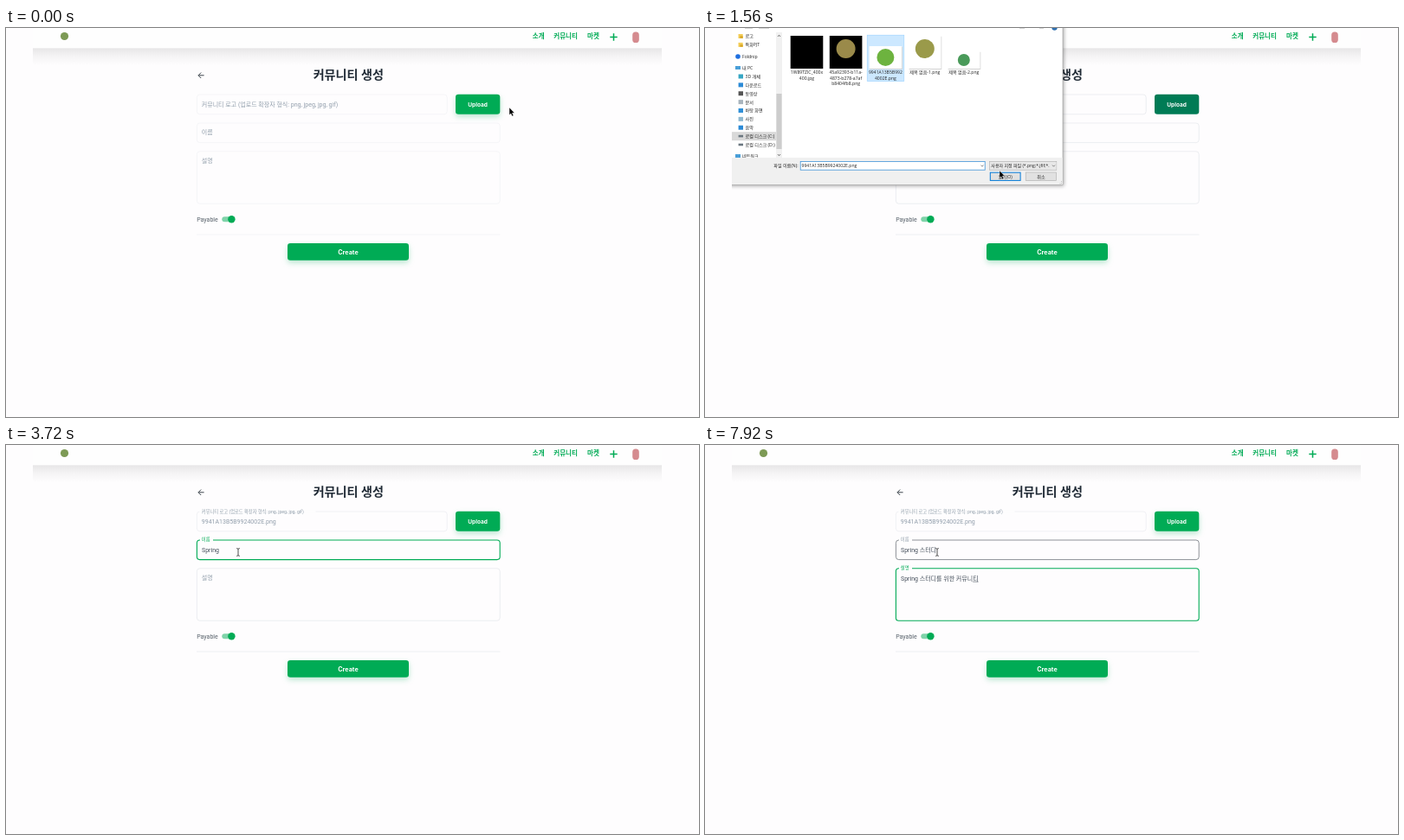
An HTML page that plays this animation: 800 by 450 pixels, repeating every 8 s.

```html
<!DOCTYPE html>
<html>
<head>
<meta charset="utf-8">
<title>커뮤니티 생성</title>
<style>
  html, body { margin: 0; width: 100%; height: 100%; overflow: hidden; background: #fefdfe; }
  svg { display: block; width: 100%; height: 100%; }
  text { font: 7px Roboto, "Noto Sans CJK KR", "Noto Sans CJK JP", sans-serif; white-space: pre; fill: #919eab; }
  .nav text { font-size: 7.5px; font-weight: 700; fill: #00ab55; }
  .title { font-size: 14.1px; font-weight: 700; fill: #212b36; }
  .btn { font-family: Inter, sans-serif; font-weight: 700; fill: #fff; text-anchor: middle; }
  .value { fill: #454f5b; }
  .box { fill: none; stroke: #dfe3e8; stroke-width: .6; }
  .glow { filter: drop-shadow(0 3px 3px rgba(0, 171, 85, .26)); }
  .dialog text { font: 5.1px "Open Sans", "Noto Sans CJK KR", "Noto Sans CJK JP", sans-serif; fill: #222; }
  .mid { text-anchor: middle; }
  .shade { filter: drop-shadow(1px 1px 2px rgba(0, 0, 0, .35)); }
</style>
</head>
<body>
<svg viewBox="0 0 800 450">
  <defs>
    <linearGradient id="fade" x2="0" y2="1">
      <stop offset="0" stop-color="#e6e5e6"/>
      <stop offset=".45" stop-color="#f4f3f4"/>
      <stop offset="1" stop-color="#fefdfe"/>
    </linearGradient>
    <clipPath id="screen"><rect x="31" y="0" width="726" height="450"/></clipPath>
  </defs>

  <rect width="800" height="450" fill="#fefdfe"/>
  <rect x="31" y="23" width="726" height="20" fill="url(#fade)"/>
  <rect x="31" width="726" height="23.3" fill="#fefefe"/>
  <circle cx="67.5" cy="9.5" r="4.6" fill="#7d9a55"/>
  <g class="nav">
    <text x="607.8" y="12">소개</text>
    <text x="632.3" y="12">커뮤니티</text>
    <text x="671" y="12">마켓</text>
    <path d="M697.3 10.5h8.4M701.5 6.3v8.4" stroke="#00ab55" stroke-width="1.5"/>
  </g>
  <rect x="723.2" y="4.5" width="7.6" height="12.5" rx="3.6" fill="#d58b8f"/>

  <path d="M228.6 54.8h-6.4M225.2 51.6l-3.2 3.2l3.2 3.2" fill="none" stroke="#3c444c" stroke-width="1"/>
  <text class="title mid" x="395.3" y="59">커뮤니티 생성</text>

  <g id="frames">
    <rect class="box" id="logoBox" x="220.4" y="77" width="288.8" height="22.8" rx="3.3"/>
    <rect class="box" id="nameBox" x="220.4" y="110" width="349.8" height="22.6" rx="3.3"/>
    <rect class="box" id="descBox" x="220.4" y="142.8" width="349.8" height="60.4" rx="3.3"/>
    <path d="M220 239h350.5" stroke="#e6e9ec" stroke-width=".7"/>
  </g>
  <g fill="#fefdfe">
    <rect id="logoGap" x="223.5" y="75.5" width="134" height="3"/>
    <rect id="nameGap" x="224" y="108.5" width="15" height="3"/>
    <rect id="descGap" x="224" y="141.3" width="15" height="3"/>
  </g>
  <text id="logoLabel">커뮤니티 로고 (업로드 확장자 형식: png, jpeg, jpg, gif)</text>
  <text id="nameLabel">이름</text>
  <text id="descLabel">설명</text>
  <text id="logoValue" x="225.8" y="90.8">9941A13B5B9924002E.png</text>
  <text class="value" id="nameValue" x="226" y="123.8"></text>
  <text class="value" id="descValue" x="226" y="156.6"></text>
  <rect id="underline" height=".6" fill="#454f5b"/>
  <rect id="caret" width=".7" height="8.6" fill="#333"/>

  <rect class="glow" id="upload" x="519" y="76.8" width="51.3" height="23" rx="3.3" fill="#00ab55"/>
  <text class="btn" x="544.6" y="90.7" style="font-size:6.5px">Upload</text>
  <text x="220.2" y="223.6" style="fill:#566069">Payable</text>
  <rect x="249.3" y="218.2" width="14.5" height="6" rx="3" fill="#7fd3a9"/>
  <circle cx="260.4" cy="221.2" r="4.2" fill="#00ab55"/>
  <rect class="glow" x="325" y="249" width="140" height="19.8" rx="3.3" fill="#00ab55"/>
  <text class="btn" x="395" y="261.5" style="font-size:7.2px">Create</text>

  <g clip-path="url(#screen)">
    <g class="dialog" id="dialog">
      <rect class="shade" x="20" y="-20" width="393" height="201.5" fill="#fff" stroke="#9a9a9a" stroke-width=".6"/>
      <path d="M46 0h9M62 0h12M363 0h6M386 0h5" stroke="#999" stroke-width=".8"/>
      <circle cx="403.5" cy="-.5" r="3.2" fill="#2f6fb0"/>
      <g id="pinned"></g>
      <g id="drives"></g>
      <rect x="82" y="5" width="7" height="145" fill="#f1f1f1"/>
      <rect x="82.4" y="76" width="6.2" height="64" fill="#cdcdcd"/>
      <path d="M84 10l1.5-1.8l1.5 1.8M84 146l1.5 1.8l1.5-1.8" fill="none" stroke="#555" stroke-width=".8"/>
      <rect id="pick" x="187.2" y="8.2" width="42.6" height="53.4" fill="#cce8ff" stroke="#99d1ff" stroke-width=".6"/>
      <g id="files"></g>
      <rect x="20" y="150" width="392.6" height="31" fill="#f0f0f0"/>
      <text x="107.5" y="161" text-anchor="end">파일 이름(N):</text>
      <rect x="110.2" y="154.4" width="213" height="9.8" fill="#fff" stroke="#3f93d8" stroke-width=".8"/>
      <text id="fileName" x="111.5" y="161"></text>
      <path id="fileCaret" d="M112.2 156v6.6" stroke="#222" stroke-width=".6"/>
      <rect x="328.4" y="154.4" width="77.4" height="9.8" fill="#e8e8e8" stroke="#adadad" stroke-width=".6"/>
      <text x="330.3" y="161" style="font-size:5px">사용자 지정 파일 (*.png;*.jfif;*.</text>
      <rect x="400" y="155" width="5.4" height="8.6" fill="#e8e8e8"/>
      <path d="M318.5 158.6l1.5 1.6l1.5-1.6M401 158.6l1.5 1.6l1.5-1.6" fill="none" stroke="#555" stroke-width=".7"/>
      <rect x="329.3" y="167.2" width="34.8" height="9.2" fill="#e1e1e1" stroke="#0078d7" stroke-width="1"/>
      <text class="mid" x="346.6" y="173.6">열기(O)</text>
      <rect x="370.2" y="167" width="35.4" height="9.6" fill="#e1e1e1" stroke="#adadad" stroke-width=".6"/>
      <text class="mid" x="388" y="173.6">취소</text>
      <path d="M411.5 177v3h-3" fill="none" stroke="#b5b5b5" stroke-width=".8" stroke-dasharray="1 1"/>
    </g>
  </g>

  <g id="cursor">
    <path id="arrow" d="M0 0v8.6l1.9-1.7l1.4 3.1l1.5-.7l-1.4-3h2.6z" fill="#000" stroke="#fff" stroke-width=".4"/>
    <path id="beam" d="M-1.8-4.4q1.8 0 1.8 1v6.8q0 1 1.8 1M1.8-4.4q-1.8 0-1.8 1M0 3.4q0 1-1.8 1" fill="none" stroke="#222" stroke-width=".8"/>
  </g>
</svg>

<script>
const LOOP = 8000, BLINK = 290;
const $ = id => document.getElementById(id);
const show = (id, on) => $(id).setAttribute('visibility', on ? 'visible' : 'hidden');
const set = (id, attrs) => { for (const k in attrs) $(id).setAttribute(k, attrs[k]); };
const ramp = (t, from, span) => Math.min(1, Math.max(0, (t - from) / span));
const smooth = p => p * p * (3 - 2 * p);

// ---- file dialog contents ----
const rect = (x, y, w, h, fill, more = '') => `<rect x="${x}" y="${y}" width="${w}" height="${h}" fill="${fill}" ${more}/>`;
const label = (x, y, s, cls = '') => `<text x="${x}" y="${y}" class="${cls}">${s}</text>`;
const folder = y => rect(38.5, y - 2.5, 5.2, 5, '#f3cd58') + rect(40.4, y - .3, 3.3, 2.8, '#d9a92c');
const sheet = y => rect(38.8, y - 2.7, 4.6, 5.4, '#fff', 'stroke="#888" stroke-width=".6"');
const pin = y => `<path d="M76.8 ${y + 1.5}l1.4-1.4m-1-1l2 2m-.8-2.4l1.4 1.4" stroke="#666" stroke-width=".7"/>`;

const links = ['Tolven', 'QOLEM', '자소서', 'LumDok', '두리온말 받은', '알고리즘', 'VSCodeProje', '2학기', 'ucc', '로고', '특화PJT'];
$('pinned').innerHTML = rect(31, 129.8, 51, 10, '#d9d9d9') +
  links.map((s, i) => {
    const y = 10 + i * 9.86;
    return (i < 5 ? folder(y) : sheet(y)) + label(46.5, y + 1.9, s) + (i < 7 ? pin(y) : '');
  }).join('') +
  label(43, 123.8, 'Foldnip') + label(43, 136.8, '내 PC') + label(43, 149.6, '네트워크');

const places = [['3D 개체', '#35a6c4'], ['다운로드', '#2b8ad6'], ['동영상', '#555'], ['문서', '#a9b4bd'], ['바탕 화면', '#2f8fd8'],
  ['사진', '#8fb8cf'], ['음악', '#2b8ad6'], ['로컬 디스크 (C:)', '#6b7780'], ['로컬 디스크 (D:)', '#6b7780']];
$('drives').innerHTML = rect(31, 120.2, 51, 10, '#d9d9d9') +
  folder(9.5) + label(46.5, 11.4, '로고') + folder(19.4) + label(46.5, 21.3, '특화PJT') +
  `<circle cx="38" cy="33" r="2.8" fill="#1f6fe0"/>` + label(43, 34.8, 'Foldnip') +
  rect(35, 44, 6, 4, '#4a9fd8') + label(43, 48, '내 PC') +
  places.map(([s, c], i) => {
    const y = 56 + i * 9.87, h = i > 6 ? 2.6 : 5;
    return rect(38.6, y - h / 2, 5.4, h, c) + label(46.5, y + 1.9, s);
  }).join('') +
  rect(35, 146, 6, 4, '#4a9fd8') + label(43, 149.6, '네트워크');

const files = [
  [117.5, 9, '#000', '', ['1W89TZlC_400x', '400.jpg']],
  [162.6, 9, '#000', '#9a8a4a', ['45a92393-b11a-', '4873-b278-a7af', 'b8404fb8.png']],
  [208.4, 21, '#fff', '#6db33f', ['9941A13B5B992', '4002E.png']],
  [253.8, 9, '#fff', '#9a9a4a', ['제목 없음-1.png']],
  [298.8, 27, '#fff', '#4a9a5a', ['제목 없음-2.png']]
];
$('files').innerHTML = files.map(([x, y, bg, dot, lines]) => {
  const h = 47 - y, r = Math.min(11, h / 2 - 3);
  return (bg === '#fff' ? rect(x - 18.2, y + .8, 37.6, h, '#c9c9c9') : '') + rect(x - 18.8, y, 37.6, h, bg) +
    (dot ? `<circle cx="${x}" cy="${y < 20 ? 24 : y + h / 2}" r="${r}" fill="${dot}"/>` : '') +
    lines.map((s, i) => label(x, 53 + i * 6.5, s, 'mid')).join('');
}).join('');

// ---- typing ----
const run = (start, step, base, parts) => parts.split('|').map((s, i) => [start + i * step, base + s]);
const nameKeys = [
  ...run(2760, 110, '', 'S|Sp|Spr|Spri|Sprin|Spring|Spring '),
  ...run(3900, 360, 'Spring ', 'ㅅ|스'),
  ...run(4500, 90, 'Spring ', '슽|스터|스턷|스터디')
];
const descKeys = [
  [5400, 'S'],
  ...run(5640, 60, '', 'Sp|Spr|Spri|Sprin|Spring|Spring |Spring ㅅ|Spring 스'),
  ...run(6360, 55, 'Spring ', '슽|스터|스턷|스터디|스터딜|스터디르|스터디를'),
  ...run(6745, 55, 'Spring 스터디를 ', '|ㅇ|우|위|윟|위하|위한|위한 '),
  ...run(7200, 60, 'Spring 스터디를 위한 ', 'ㅋ|커|컴|커뮤|커뮨|커뮤니|커뮤닡|커뮤니티')
];
const typed = (keys, t, focus) => keys.reduce((cur, k) => k[0] <= t ? k : cur, [focus, '']);

// ---- timeline ----
const CLICK = 240, OPEN = 480, TREE = 1140, PICK = 1320, CLOSE = 1860, NAME = 2430, DESC = 5040;
const path = [[0, 581, 92], [240, 550, 90], [450, 544, 89], [1020, 230, 97], [1260, 208, 42], [1340, 209, 43],
  [1560, 340, 165], [1740, 345, 170], [1900, 344, 169], [2360, 268, 124]];

function pointer(t) {
  const i = path.findIndex(p => p[0] > t);
  if (i < 0) return path[path.length - 1].slice(1);
  const [a, b] = [path[i - 1], path[i]], p = smooth((t - a[0]) / (b[0] - a[0]));
  return [a[1] + (b[1] - a[1]) * p, a[2] + (b[2] - a[2]) * p];
}

// floating label: slides up to the border and shrinks to 3/4
function float(id, t, from, y) {
  const p = smooth(ramp(t, from, 110));
  set(id + 'Label', { transform: `translate(225.8 ${y - 12.2 * p}) scale(${1 - .25 * p})` });
  show(id + 'Gap', p > .3);
}

function outline(id, focused, hovered) {
  $(id + 'Box').style.cssText = focused ? 'stroke:#00ab55;stroke-width:1.1' : hovered ? 'stroke:#5c636b;stroke-width:.7' : '';
  $(id + 'Label').style.fill = focused ? '#00ab55' : '';
}

function draw(t) {
  const [x, y] = pointer(t), beam = t >= 1960;
  set('cursor', { transform: `translate(${x.toFixed(2)} ${y.toFixed(2)})` });
  show('arrow', !beam);
  show('beam', beam);

  const busy = t >= CLICK && t < CLOSE;
  set('upload', { fill: busy ? '#007b55' : '#00ab55', class: busy ? '' : 'glow' });
  set('frames', { opacity: .5 + .5 * ramp(t, 200, 200) });
  $('logoBox').style.opacity = t < CLOSE ? 1 : .75;

  const open = t >= OPEN && t < CLOSE;
  $('dialog').style.display = open ? '' : 'none';
  $('dialog').style.opacity = ramp(t, OPEN - 30, 90);
  $('pinned').style.display = t < TREE ? '' : 'none';
  $('drives').style.display = t < TREE ? 'none' : '';
  $('pick').style.display = t < PICK ? 'none' : '';
  $('fileCaret').style.display = t < PICK ? '' : 'none';
  $('fileName').textContent = t < PICK ? '' : '9941A13B5B9924002E.png';

  show('logoValue', t >= CLOSE);
  float('logo', t, CLOSE, 90.7);
  float('name', t, NAME, 123.4);
  float('desc', t, DESC, 156.3);
  const onName = t >= NAME && t < DESC, onDesc = t >= DESC;
  outline('name', onName, beam && y < 132);
  outline('desc', onDesc, beam && y > 143);

  const name = typed(nameKeys, t, NAME), desc = typed(descKeys, t, DESC);
  $('nameValue').textContent = name[1];
  $('descValue').textContent = desc[1];

  const [last, text] = onDesc ? desc : name;
  const el = $(onDesc ? 'descValue' : 'nameValue'), base = onDesc ? 156.6 : 123.8;
  const width = text ? el.getSubStringLength(0, text.length) : 0;
  const before = text.length > 1 ? el.getSubStringLength(0, text.length - 1) : 0;
  const active = onName || onDesc;
  set('caret', { x: 226 + width, y: base - 6.6 });
  show('caret', active && Math.floor((t - last) / BLINK) % 2 === 0);
  set('underline', { x: 226 + before, y: base + 1.2, width: width - before });
  show('underline', active && /[ㄱ-힣]$/.test(text));
}

const start = performance.now();
function tick() {
  draw((performance.now() - start) % LOOP);
  requestAnimationFrame(tick);
}
tick();
</script>
</body>
</html>
```
